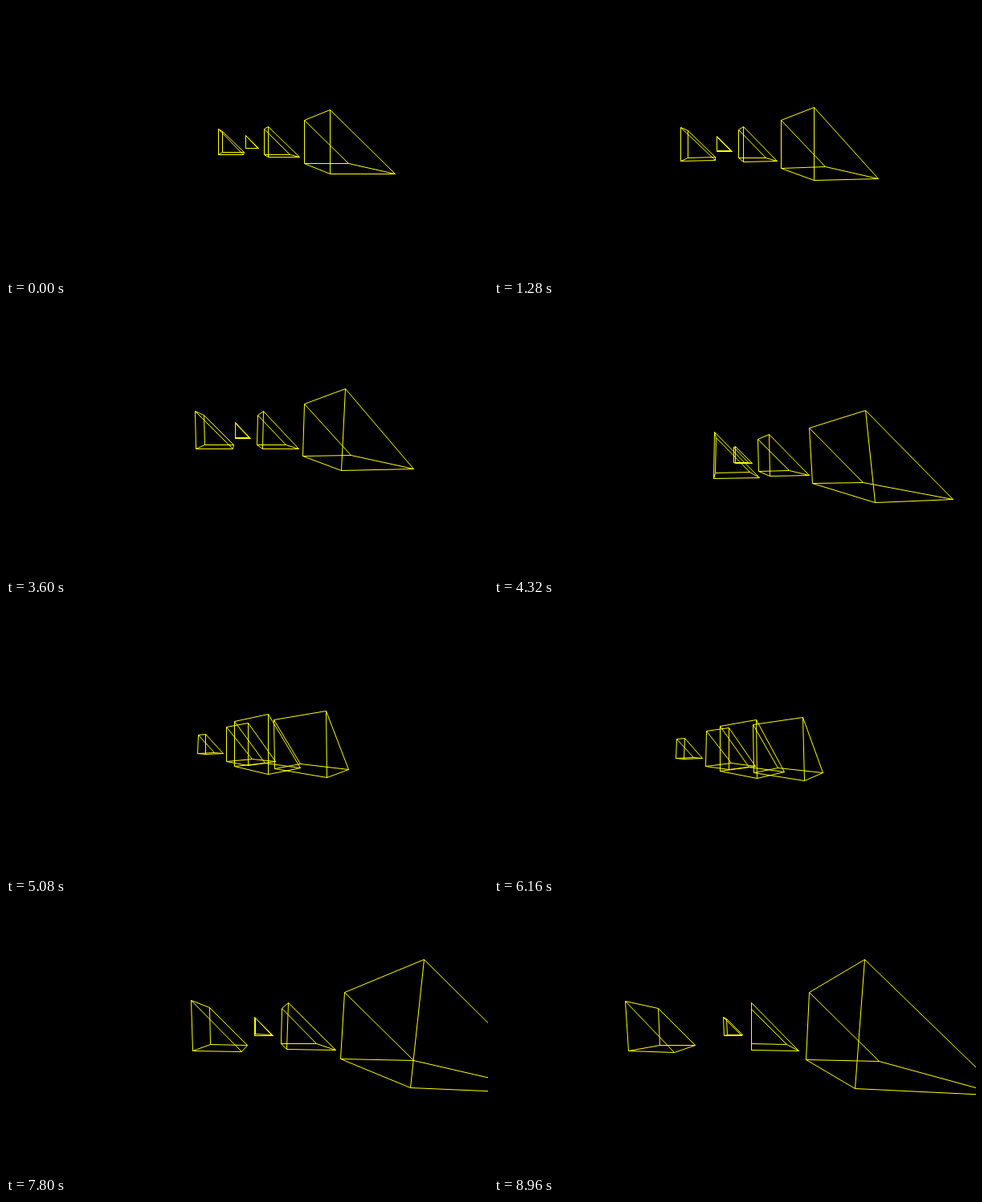
Recreate the animation shown at these times as an HTML page with a canvas. Size 600 px wide and 338 px high, loop 9000 ms.

```html
<!DOCTYPE html>
<html lang="en">
<head>
<meta charset="utf-8">
<title>Wireframe wedges</title>
<style>
  html, body { margin: 0; width: 100%; height: 100%; overflow: hidden; background: #000; }
  canvas { display: block; width: 100vw; height: 100vh; }
</style>
</head>
<body>
<canvas id="stage" width="600" height="338"></canvas>
<script>
const W = 600, H = 338, LOOP = 9000, TICK = 40;
const FOCAL = W / 2 / Math.tan(Math.PI / 3); // 120 degree horizontal view
const ctx = document.getElementById('stage').getContext('2d');

// Wedges: centre x, centre z, edge length
const wedges = [[0, 0, 1], [1, 5, 1], [3, 4, 2], [6, 2, 3]];

const linear = u => u;
const smooth = u => u * u * (3 - 2 * u);

// Each leg moves from the value before it: start, end, new value; holds between legs
function follow(value, legs, ease, t) {
  for (const [start, end, next] of legs) {
    const u = Math.min(Math.max((t - start) / (end - start), 0), 1);
    value += (next - value) * ease(u);
  }
  return value;
}

// Walking at a steady pace: ahead, ahead, left, back right, right
const walkX = [[0, 680, .6], [3920, 5150, -2.413], [6160, 7800, .875], [7800, 8560, 1.99]];
const walkZ = [[0, 680, -4.78], [2400, 2900, -4.33], [3920, 5150, -1.94],
  [6160, 6900, -2.79], [6900, 7800, -3.155], [7800, 8560, -3.05]];

// Looking around: right and back, then settling on each view
const yaw = [[1080, 1920, .85], [2080, 2640, -.37], [2760, 3600, .077],
  [3600, 3920, -.04], [3920, 5375, .775], [6160, 7600, -.1], [7800, 8520, -.112]];

// Two long glances upward, with small corrections before them
const pitch = [[1080, 1920, -.11], [2080, 2320, .06], [2320, 2760, 0], [3000, 3600, .075],
  [3920, 4380, -.11], [4380, 5080, -.03], [5080, 5480, -.7], [5480, 6160, -.063],
  [6160, 7800, .09], [7800, 8200, -.38], [8200, 8960, .087]];

function cameraAt(t) {
  return {
    x: follow(.643, walkX, linear, t),
    z: follow(-5.955, walkZ, linear, t),
    yaw: follow(0, yaw, smooth, t),
    pitch: follow(0, pitch, smooth, t)
  };
}

function project(cam, x, y, z) {
  const s = Math.sin(cam.yaw), c = Math.cos(cam.yaw);
  const sp = Math.sin(cam.pitch), cp = Math.cos(cam.pitch);
  const dx = x - cam.x, dz = z - cam.z;
  const depth = s * dx + c * dz;
  const scale = FOCAL / (depth * cp + y * sp);
  return [
    Math.round(W / 2 + (c * dx - s * dz) * scale) + .5,
    Math.round(H / 2 + (y * cp - depth * sp) * scale) + .5
  ];
}

function polygon(points) {
  points.forEach(p => ctx.lineTo(...p));
  ctx.closePath();
}

function drawWedge(cam, [cx, cz, size]) {
  const r = size / 2;
  const [near, far] = [-r, r].map(z =>
    [[-r, -r], [-r, r], [r, r]].map(([x, y]) => project(cam, cx + x, y, cz + z)));
  ctx.beginPath();
  for (const face of [near, far]) {
    ctx.moveTo(...face[0]);
    polygon(face);
  }
  near.forEach((p, i) => {
    ctx.moveTo(...p);
    ctx.lineTo(...far[i]);
  });
  ctx.stroke();
}

function draw(t) {
  const cam = cameraAt(t);
  ctx.fillStyle = '#000';
  ctx.fillRect(0, 0, W, H);
  ctx.strokeStyle = '#ff0';
  ctx.lineWidth = 1;
  ctx.lineJoin = 'bevel';
  for (const wedge of wedges) drawWedge(cam, wedge);
}

const start = performance.now();
function loop() {
  const t = (performance.now() - start) % LOOP;
  draw(Math.floor(t / TICK) * TICK);
  requestAnimationFrame(loop);
}
loop();
</script>
</body>
</html>
```
